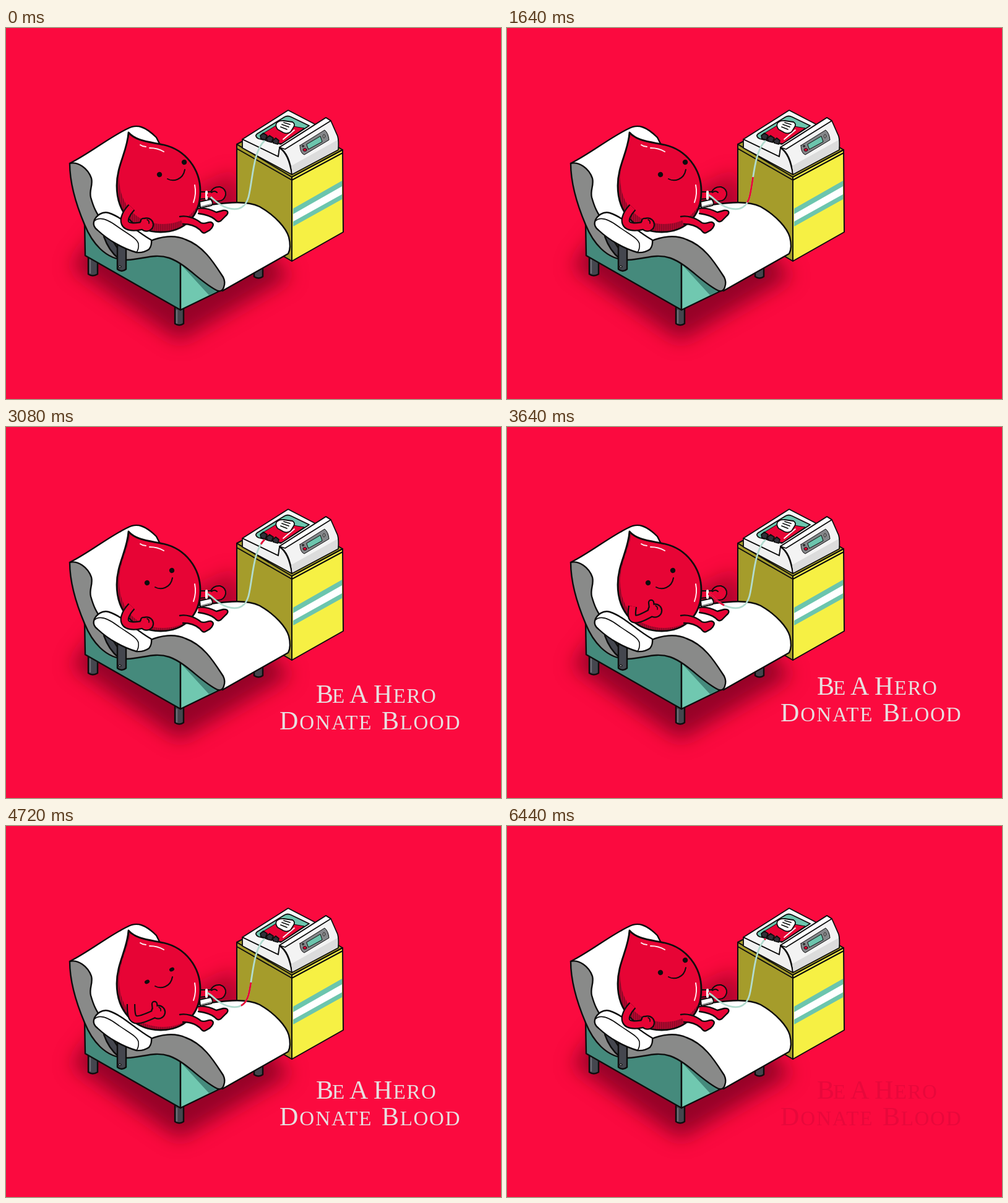
An HTML page that plays this animation: 800 by 600 pixels, repeating every 6.52 s.

```html
<!DOCTYPE html>
<html lang="en">
<head>
<meta charset="utf-8">
<title>Be A Hero</title>
<style>
  html, body { margin: 0; width: 100%; height: 100%; overflow: hidden; background: #fb0a3f; }
  svg { display: block; width: 800px; height: 600px; }
  .ink { stroke: #0d0d0d; stroke-width: 2; stroke-linejoin: round; stroke-linecap: round; }
  .line { fill: none; }
  .bold { stroke-width: 2.4; }
  text { font-family: "Liberation Serif", "Noto Serif", serif; }
</style>
</head>
<body>
<svg viewBox="0 0 800 600">
  <defs>
    <filter id="blur" x="-30%" y="-30%" width="160%" height="160%"><feGaussianBlur stdDeviation="16"/></filter>
    <path id="drop" d="M198 169 C210 183 232 184 255 189 C290 197 314 228 314 264 C314 305 288 330 250 330 C208 330 179 300 179 255 C179 222 196 200 198 169 Z"/>
    <clipPath id="dropClip"><use href="#drop"/></clipPath>
    <pattern id="hatch" width="3" height="3" patternUnits="userSpaceOnUse">
      <rect width="3" height="3" fill="#b3082f"/><rect width="1" height="3" fill="#7d0824"/>
    </pattern>
  </defs>
  <rect width="800" height="600" fill="#fb0a3f"/>

  <g filter="url(#blur)" fill="#7c0020">
    <path d="M106 386 L280 506 L460 402 L380 320 L150 330 Z" opacity=".78"/>
    <path d="M300 268 L372 234 L390 310 L300 310 Z" opacity=".6"/>
  </g>

  <g id="cabinet" class="ink">
    <path d="M373 188 L462 240 V377 L373 325 Z" fill="#a59c2b"/>
    <path d="M462 240 L544 197 L545 330 L462 377 Z" fill="#f6f044"/>
    <path d="M373 188 L455 145 L544 197 L462 241 Z" fill="#a59c2b"/>
    <path d="M373 195 L462 246 L544 202" class="line"/>
    <g stroke="none">
      <path d="M464 292 L543 247 V277 L464 321 Z" fill="#6cc5ad"/>
      <path d="M464 301 L543 256 V269 L464 313 Z" fill="#fff"/>
    </g>
  </g>

  <g id="machine" class="ink" style="stroke-width:1.8">
    <path d="M382 180 L456 133 L504 158 L442 195 L440 208 Z" fill="#f7f7f7"/>
    <path d="M406 171 L450 144 Q455 141 461 144 L490 158 L444 188 L408 179 Q401 175 406 171 Z" fill="#6cc5ad"/>
    <path d="M413 172 L441 155 L482 162 L445 187 L416 179 Z" fill="#e70435" stroke-width="1"/>
    <path d="M448 180 L466 165" style="stroke:#fff" class="line"/>
    <path d="M437 154 Q441 149 449 150 L463 152 Q468 155 465 160 L460 168 Q455 172 448 169 L439 164 Q435 159 437 154 Z" fill="#fff"/>
    <path d="M444 160 L454 164 M446 156 L457 160 M449 153 L459 156" class="line"/>
    <path d="M411 174 l5 -4 6 4 -3 7 -7 -2 Z M421 178 l5 -4 6 4 -3 7 -7 -2 Z M431 182 l5 -4 5 4 -2 6 -7 -2 Z" fill="#303038"/>
    <path d="M382 180 L440 208 L442 194 C452 201 458 213 462 237 L382 194 Z" fill="#f0f0f0"/>
    <path d="M442 193 L517 145 L525 150 L536 175 Q538 182 537 197 L462 237 C460 215 453 200 442 193 Z" fill="#f3f3f3"/>
    <path d="M442 193 L517 145 L525 150 L451 196 Z" fill="#fff"/>
    <path d="M461 223 L536 181 V196 L463 235 Z" fill="#dcdcdc" stroke="none"/>
    <path d="M475 190 L515 165 Q521 170 522 181 L482 205 Q475 202 475 190 Z" fill="#85878a" stroke-width="1"/>
    <path d="M486 188 L508 175 L511 184 L489 196 Z" fill="#6cc5ad" stroke-width="1"/>
    <ellipse cx="483" cy="197" rx="3" ry="2.3" fill="#e70435" stroke-width="1"/>
    <circle cx="480" cy="191" r="1.5" fill="#555" stroke-width=".8"/>
    <ellipse cx="514" cy="175" rx="1.6" ry="3" fill="#aaa" stroke-width=".8"/>
  </g>

  <g id="chair" class="ink bold">
    <g fill="#44464e">
      <path d="M133 366 V398 Q140 403 148 398 V374 Z"/>
      <path d="M273 448 V478 Q280 483 287 478 V450 Z"/>
      <path d="M401 388 V402 Q408 407 415 402 V386 Z"/>
    </g>
    <path d="M136 375 V396 M276 457 V477" class="line" style="stroke:#6c6e76"/>
    <path d="M127 315 L128 368 L282 456 V370 Z" fill="#458a7c"/>
    <path d="M282 370 V456 L352 422 L340 395 Z" fill="#70c8b0"/>
    <path d="M284 384 L328 432 L347 423 L300 390 Z" fill="#458a7c" stroke="none"/>
    <path d="M103 219 C135 203 165 178 196 163 C212 154 226 160 243 177 L300 290 L330 286 C360 282 390 279 410 289 C436 304 453 324 457 338 C460 350 460 358 456 365 L350 425 L340 410 L280 360 L190 360 L125 280 Z" fill="#fff"/>
    <path d="M103 219 C116 216 132 226 138 243 C141 254 134 262 137 274 C142 292 146 298 152 308 C166 336 200 347 232 345 C250 337 272 334 290 342 C320 353 336 380 351 403 Q355 411 352 419 Q350 427 342 425 C315 412 292 382 264 372 C240 364 222 374 196 375 C160 376 138 345 127 318 C113 285 103 250 103 219 Z" fill="#898a89"/>
    <path d="M158 337 L166 334 L186 365 L182 373 Q166 360 158 337 Z" fill="#44464e"/>
    <path d="M180 348 V390 Q187 396 194 390 V352 Z" fill="#44464e"/>
    <circle cx="184" cy="386" r="1.8" fill="#999" stroke-width="1"/>
    <path d="M142 313 C145 303 156 296 166 299 C190 307 207 327 235 343 Q236 352 231 358 Q222 364 211 363 C190 357 166 344 148 327 Q140 321 142 313 Z" fill="#fff"/>
    <path d="M142 313 C150 304 164 309 180 321 C198 334 212 340 214 349 Q215 357 211 363" class="line" style="stroke-width:1.6"/>
  </g>

  <g id="farArm" class="ink">
    <path d="M313 281 L331 277 Q336 283 332 287 L314 291 Z" fill="#fff"/>
    <path d="M316 289 L331 285" class="line" style="stroke:#898a89"/>
    <path d="M311 265 L331 265 Q335 256 346 257 Q356 260 355 270 Q352 281 341 280 Q336 279 333 275 L312 277 Z" fill="#e70435"/>
    <path d="M332 266 Q337 262 341 266" class="line"/>
    <path d="M324 265 V276" style="stroke:#fff;stroke-width:4"/>
  </g>

  <g id="body">
    <use href="#drop" fill="url(#hatch)"/>
    <g clip-path="url(#dropClip)"><use id="lit" href="#drop" fill="#e70435"/></g>
    <use href="#drop" class="ink line" style="stroke-width:2.8"/>
    <path d="M217 189 Q221 192 226 192 M232 194 Q245 194 255 200 M305 254 Q308 268 303 282" fill="none" stroke="#ffe9ee" stroke-width="2" stroke-linecap="round"/>
    <g fill="#e70435" class="ink bold">
      <path d="M310 292 C320 290 332 294 340 298 L351 295 C360 294 360 300 355 304 L347 312 C342 315 340 312 337 309 C330 303 318 301 311 300"/>
      <path d="M281 305 C290 303 304 306 315 315 C322 318 326 313 331 314 C338 316 334 323 329 327 L322 331 C318 333 316 329 313 326 C305 319 295 317 286 317"/>
    </g>
    <g id="face">
      <ellipse class="eye" cx="248" cy="237" rx="4.2" ry="4.2" transform="rotate(-25 248 237)" fill="#0d0d0d"/>
      <ellipse class="eye" cx="288" cy="217" rx="4.2" ry="4.2" transform="rotate(-25 288 217)" fill="#0d0d0d"/>
      <path d="M261 244 C270 249 286 246 289 229" class="ink line"/>
    </g>
  </g>

  <g id="arm" fill="none" stroke-linejoin="round"></g>

  <path id="tube" d="M325 270 C332 271 340 286 358 291 C378 297 388 288 392 273 C399 245 399 200 418 182" fill="none" stroke="#b2dccf" stroke-width="2.8"/>
  <g id="pulses" fill="none" stroke="#e70435" stroke-width="2.8"></g>

  <g id="title"></g>
</svg>
<script>
const LOOP = 6520, BEAT = LOOP / 2, TUBE = 183, PULSE = 43;
const $ = id => document.getElementById(id);
const svgNode = (tag, attrs, parent) => {
  const node = document.createElementNS('http://www.w3.org/2000/svg', tag);
  for (const k in attrs) node.setAttribute(k, attrs[k]);
  return parent.appendChild(node);
};
const mix = (a, b, k) => a + (b - a) * k;
const clamp = x => Math.max(0, Math.min(1, x));
const ease = x => (1 - Math.cos(Math.PI * clamp(x))) / 2;

// Interpolates rows of [time, ...values].
function track(rows, t) {
  let i = 0;
  while (i < rows.length - 2 && t >= rows[i + 1][0]) i++;
  const [a, b] = [rows[i], rows[i + 1]];
  const k = ease((t - a[0]) / (b[0] - a[0]));
  return a.slice(1).map((v, n) => mix(v, b[n + 1], k));
}

const turn = [[2240, 0], [2920, 1], [5460, 1], [6180, 0]];
const blink = [[4660, 1], [4820, .12], [4980, 1]];
const lift = [[2600, 18], [3560, -8], [4640, 0]];
const show = [[2600, 0], [3060, 1], [5880, 1], [6420, 0]];

// shoulder, two curve handles, hand, thumb
const rest = [203, 290, 186, 308, 184, 330, 227, 318, 0];
const thumbsUp = [202, 288, 202, 318, 206, 320, 246, 301, 1];
const armMoves = [
  [3120, ...rest],
  [3620, 203, 290, 199, 314, 203, 318, 239, 297, 1],
  [4040, ...thumbsUp],
  [5400, ...thumbsUp],
  [5720, 202, 289, 200, 320, 206, 322, 243, 304, .9],
  [6160, ...rest]
];

const pulses = [0, 1].map(() => svgNode('path', {
  d: $('tube').getAttribute('d'), pathLength: TUBE, 'stroke-dasharray': PULSE + ' 1000'
}, $('pulses')));

const layers = [['#0d0d0d', 4.4], ['#e70435', 0]].map(([color, grow]) => ({
  limb: svgNode('path', { stroke: color, 'stroke-width': 10 + grow }, $('arm')),
  fist: svgNode('ellipse', { fill: color, rx: 10 + grow / 2, ry: 9.5 + grow / 2 }, $('arm')),
  thumb: svgNode('path', { stroke: color, 'stroke-width': 6 + grow, 'stroke-linecap': 'round' }, $('arm'))
}));
const knuckles = svgNode('path', { class: 'ink', style: 'stroke-width:1.6' }, $('arm'));

// word, x, baseline, letter spacing
const words = [
  ['Be', 501, 441, -2], ['A', 555, 441, 0], ['Hero', 594, 441, 1.5],
  ['Donate', 442, 484, 2], ['Blood', 607, 484, 1.7]
];
const [ghost, glow] = ['#a00030', '#e8dfe0'].map(fill => {
  const g = svgNode('g', { fill }, $('title'));
  for (const [word, x, y, gap] of words) {
    const text = svgNode('text', { x, y, 'letter-spacing': gap }, g);
    svgNode('tspan', { 'font-size': 42 }, text).textContent = word[0];
    svgNode('tspan', { 'font-size': 33 }, text).textContent = word.slice(1).toUpperCase();
  }
  return g;
});

function drawArm(t) {
  const [sx, sy, ax, ay, bx, by, hx, hy, up] = track(armMoves, t);
  for (const { limb, fist, thumb } of layers) {
    limb.setAttribute('d', `M${sx} ${sy} C${ax} ${ay} ${bx} ${by} ${hx} ${hy}`);
    fist.setAttribute('cx', hx);
    fist.setAttribute('cy', hy);
    thumb.setAttribute('d', `M${hx - 5} ${hy - 4} L${hx - 5 - up} ${hy - 6 - 7 * up}`);
  }
  knuckles.setAttribute('d', `M${hx + 1} ${hy - 8} q4 2 3 6`);
}

function draw(t) {
  const [side] = track(turn, t);
  $('face').setAttribute('transform', `translate(${-20 * side} ${15 * side})`);
  $('lit').setAttribute('transform', `translate(4 ${mix(-13, -5, side)})`);
  const [open] = track(blink, t);
  document.querySelectorAll('.eye').forEach(e => e.setAttribute('ry', 4.2 * open));

  drawArm(t);

  const age = (t + 100) % BEAT;
  pulses.forEach((p, i) => {
    const head = (age + i * BEAT) * .068;
    p.setAttribute('stroke-dashoffset', PULSE - head);
  });

  $('title').setAttribute('transform', `translate(0 ${track(lift, t)[0]})`);
  glow.setAttribute('opacity', track(show, t)[0]);
  ghost.setAttribute('opacity', t > 5880 ? .2 : 0);
}

const start = performance.now();
function tick() {
  draw((performance.now() - start) % LOOP);
  requestAnimationFrame(tick);
}
draw(0);
requestAnimationFrame(tick);
</script>
</body>
</html>
```
